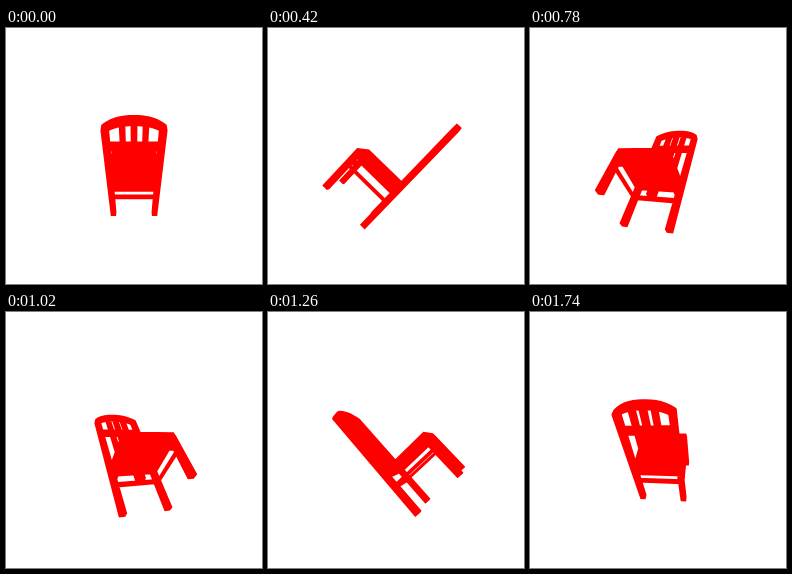
Write an HTML page with a canvas that moves like this. It is 256 px wide and 256 px high and loops after 1.8 s.

```html
<!DOCTYPE html>
<html lang="en">
<head>
<meta charset="utf-8">
<title>Turning chair</title>
<style>
html, body { margin: 0; width: 100%; height: 100%; overflow: hidden; background: #fff; }
canvas { display: block; width: 100vw; height: 100vh; }
</style>
</head>
<body>
<canvas id="stage" width="256" height="256"></canvas>
<script>
const ctx = document.getElementById("stage").getContext("2d");
const STEP = 60, STEPS = 30;
const CENTER = 128, DIST = 240;
const LEAN = 0.7615, SIN = Math.sin(LEAN), COS = Math.cos(LEAN);

// Each part is a list of corners: x across, u up the back, v towards the seat front.
const parts = [];

function prism(outline, v0, v1) {
  parts.push(outline.flatMap(([x, u]) => [[x, u, v0], [x, u, v1]]));
}

function box(x0, x1, u0, u1, v0, v1) {
  prism([[x0, u0], [x1, u0], [x1, u1], [x0, u1]], v0, v1);
}

function archTop(x) {
  return 129 - 9 * Math.pow(Math.abs(x) / 25.5, 2.5);
}

function buildChair() {
  for (const side of [-1, 1]) {
    box(19.8 * side, 25.7 * side, 0, 119, -3, 3);   // stile and rear leg
    box(19.8 * side, 25.7 * side, 1, 45, 47, 53);   // front leg
    box(23.2 * side, 25.7 * side, 30, 33, 0, 50);   // side stretcher
    box(6.8 * side, 11.5 * side, 45, 124, -3, 3);   // outer slat
  }
  box(-2.6, 2.6, 45, 124, -3, 3);                   // middle slat
  box(-23, 23, 97, 103, -3, 3);                     // lower back rail
  box(-25.3, 25.3, 41, 48.5, -1, 53);               // seat
  box(-23, 23, 29, 33, -1.5, 1.5);                  // rear stretcher
  box(-23, 23, 30, 34, 48.5, 51.5);                 // front stretcher

  const n = 14;
  for (let i = 0; i < n; i++) {
    const a = -25.5 + 51 * i / n, b = -25.5 + 51 * (i + 1) / n;
    prism([[a, archTop(a)], [b, archTop(b)], [b, archTop(b) - 6], [a, archTop(a) - 6]], -3, 3);
  }
}

function project([x, u, v], turn) {
  const p = -28 + SIN * u - COS * v;
  const y = 64.5 - COS * u - SIN * v;
  const c = Math.cos(turn), s = Math.sin(turn);
  const scale = DIST / (DIST + x * s - p * c);
  return [CENTER + (x * c + p * s) * scale, CENTER + y * scale];
}

function hull(points) {
  const sorted = points.slice().sort((a, b) => a[0] - b[0] || a[1] - b[1]);
  const cross = (o, a, b) => (a[0] - o[0]) * (b[1] - o[1]) - (a[1] - o[1]) * (b[0] - o[0]);
  const chain = list => {
    const out = [];
    for (const q of list) {
      while (out.length > 1 && cross(out[out.length - 2], out[out.length - 1], q) <= 0) out.pop();
      out.push(q);
    }
    out.pop();
    return out;
  };
  return chain(sorted).concat(chain(sorted.reverse()));
}

function draw(time) {
  const turn = Math.floor(time / STEP) % STEPS / STEPS * 2 * Math.PI;
  ctx.fillStyle = "#fff";
  ctx.fillRect(0, 0, 256, 256);
  ctx.fillStyle = "#f00";
  ctx.beginPath();
  for (const part of parts) {
    hull(part.map(c => project(c, turn))).forEach(([x, y], i) => i ? ctx.lineTo(x, y) : ctx.moveTo(x, y));
    ctx.closePath();
  }
  ctx.fill();
}

buildChair();
const start = performance.now();
function tick() {
  draw(performance.now() - start);
  requestAnimationFrame(tick);
}
tick();
</script>
</body>
</html>
```
